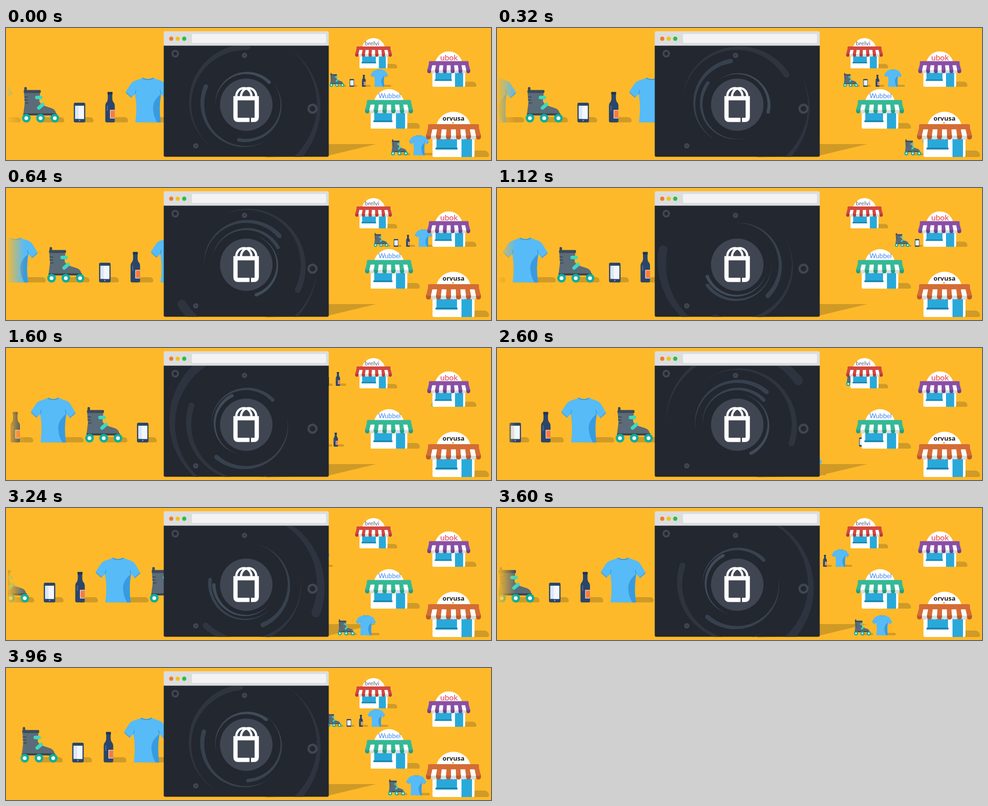
Recreate the animation shown at these times as an HTML page with a canvas. Size 970x265 px, loop 4000 ms.

```html
<!DOCTYPE html>
<html lang="en">
<head>
<meta charset="utf-8">
<title>Products travelling to shops</title>
<style>
  html, body { margin: 0; width: 100%; height: 100%; overflow: hidden; background: #fdb92a; }
  canvas { display: block; }
</style>
</head>
<body>
<canvas id="stage" width="970" height="265"></canvas>
<script>
const ctx = document.getElementById('stage').getContext('2d');
const LOOP = 4000, GROUND = '#fdb92a', SHADOW = '#d09a27', RAD = Math.PI / 180;

const fill = (color, path) => { ctx.fillStyle = color; ctx.fill(new Path2D(path)); };
const rect = (color, x, y, w, h, r = 0) => {
  ctx.fillStyle = color;
  ctx.beginPath();
  ctx.roundRect(x, y, w, h, r);
  ctx.fill();
};
const disc = (color, x, y, r) => {
  ctx.fillStyle = color;
  ctx.beginPath();
  ctx.arc(x, y, r, 0, 7);
  ctx.fill();
};
const ring = (color, x, y, r, width) => {
  ctx.strokeStyle = color;
  ctx.lineWidth = width;
  ctx.beginPath();
  ctx.arc(x, y, r, 0, 7);
  ctx.stroke();
};
const line = (color, width, path) => {
  ctx.strokeStyle = color;
  ctx.lineWidth = width;
  ctx.stroke(new Path2D(path));
};
const at = (x, y, scale, draw) => {
  ctx.save();
  ctx.translate(x, y);
  ctx.scale(scale, scale);
  draw();
  ctx.restore();
};
const clipped = (x, w, draw) => {
  ctx.save();
  ctx.beginPath();
  ctx.rect(x, 0, w, 265);
  ctx.clip();
  draw();
  ctx.restore();
};
const floorShadow = end => rect(SHADOW, 0, -10.5, end, 10.5, [0, 9, 5, 0]);

// Products stand on y = 0, centred on x = 0.
function skate() {
  floorShadow(48);
  rect('#3b4a59', -32, -71, 5, 12, 2);
  fill('#5b6b78', 'M-33-64H0L-2-43Q0-36 9-33L24-28Q31-25 32-16H-34L-31-40Z');
  rect('#3b4a59', -33, -65, 34, 6, 2);
  line('#3b4a59', 2, 'M-32-51h7M-32-45h7M-31-39h7');
  rect('#37434f', -34, -18, 67, 4, 1);
  line('#37434f', 4, 'M-28-10L-22-15M0-10V-15M29-10L22-15');
  ctx.lineCap = 'round';
  line('#3fd9bd', 7, 'M-7-50H1M-3-29L5-36');
  ctx.lineCap = 'butt';
  for (const x of [-28, 0.5, 29]) {
    disc('#0fae9c', x, -8.5, 8.7);
    disc('#fff', x, -8.5, 3.8);
  }
}
function phone() {
  floorShadow(28);
  rect('#2c4568', -11.5, -39.5, 23, 39.5, 3);
  rect('#dce8f8', -9, -33.5, 18, 26.5, 0.5);
  fill('#f3f7fd', 'M-2-33.5H9V-7H-2Z');
  disc('#8fa3bd', 0, -3.6, 1.3);
}
function bottle() {
  floorShadow(36);
  fill('#2c4568', 'M-4.500-61H4.500V-47Q4.500-43 8-39Q9.500-37 9.500-33V-3Q9.500 0 6.500 0H-6.500Q-9.500 0-9.500-3V-33Q-9.500-37-8-39Q-4.500-43-4.500-47Z');
  rect('#203453', -5, -61, 10, 5, 1);
  rect('#48638a', -6.500, -34, 2.500, 11, 1);
  rect('#fff', 0, -25, 9.5, 17);
  rect('#f57b45', 1, -24, 8.5, 15);
}
function shirt() {
  floorShadow(61);
  fill('#56bbf7', 'M-11-89Q0-85 11-89L25-84Q32-82 36-74L45-59L33-49L26-57Q21-28 25.500 0H-25.500Q-21-28-26-57L-33-50L-45-61L-36-75Q-32-82-25-84Z');
  fill('#389be0', 'M26-57Q9-44 10-27Q11-12 18 0H25.500Q21-28 26-57Z');
  line('#389be0', 2, 'M-11-89Q0-83 11-89');
  line('#389be0', 1.5, 'M-44-60L-33-50M44-59L33-49M-26-57L-24-65M26-57L24-65');
}

const belt = [[skate, 68.5], [phone, 147], [bottle, 208], [shirt, 284]];

// Each lane: lead position x at time `when`, then speed and acceleration per ms.
const lanes = [
  { y: 76, scale: 0.45, end: 735, when: 2040, x: 693, speed: 0.11, accel: -2e-5,
    items: [[skate, -33.5], [phone, 0], [bottle, 23]] },
  { y: 118, scale: 0.39, end: 885, when: 0, x: 746.5, speed: 0.145, accel: -1.1e-5,
    items: [[skate, -85], [phone, -55], [bottle, -31], [shirt, 0]] },
  { y: 198, scale: 0.46, end: 766, when: 2040, x: 679, speed: 0.09, accel: 0,
    items: [[phone, 0], [bottle, 20]] },
  { y: 255.5, scale: 0.45, end: 895, when: 0, x: 826, speed: 0.14, accel: 0,
    items: [[skate, -39.5], [shirt, 0]] }
];

const stores = [
  { x: 735, y: 81, scale: 0.667, color: '#d44840', dark: '#b43a35',
    name: 'brelvi', ink: '#55607a', font: '12px Lato, sans-serif', tx: 732, ty: 35 },
  { x: 885.5, y: 118, scale: 0.78, color: '#894fa5', dark: '#70408a',
    name: 'ubok', ink: '#e2383f', font: '16px Lato, sans-serif', tx: 886, ty: 65 },
  { x: 766, y: 202, scale: 0.87, color: '#36b896', dark: '#279d80',
    name: 'Wubbel', ink: '#4285f4', font: '13px Lato, sans-serif', tx: 767, ty: 141 },
  { x: 895, y: 259, scale: 1, color: '#d46c36', dark: '#b9592d',
    name: 'orvusa', ink: '#27221f', font: 'bold 13px "Open Sans", sans-serif', tx: 895, ty: 186, dot: [894, 190.5, 1.8] }
];

function store(s) {
  at(s.x, s.y, s.scale, () => {
    rect(SHADOW, 38, -13, 33, 13, [0, 12, 5, 0]);
    disc('#fff', 0, -56, 35);
    rect('#fff', -42, -46, 84, 46, [0, 0, 3, 3]);
    rect('#e4e6e8', -42, -40, 84, 5);
    rect('#29a9d9', -34, -36, 41, 18);
    rect('#1d86b4', -36, -19, 44, 4, 1);
    rect('#29a9d9', 16, -36, 21, 36);
    const stripes = 11, topWidth = 102 / stripes;
    for (let i = 0; i < stripes; i++) {
      const x = -55 + i * 10, top = -51 + i * topWidth;
      const even = i % 2 === 0;
      rect(even ? s.dark : '#d9dcdf', x, -45, 10, 10, [0, 0, 5, 5]);
      fill(even ? s.color : '#fff', `M${top}-58h${topWidth}L${x + 10}-43H${x}Z`);
    }
    rect(s.color, -51, -66, 102, 10.5, [3, 3, 0, 0]);
  });
  ctx.font = s.font;
  ctx.textAlign = 'center';
  ctx.fillStyle = s.ink;
  ctx.fillText(s.name, s.tx, s.ty);
  if (s.dot) disc('#f39a2b', ...s.dot);
}

// Inner radius, head width, head angle at the start, turns per loop, colour.
const swirls = [
  [142, 18, 90.4, 1, '#2e343f'],
  [109.5, 12, 271, 2, '#2e353f'],
  [83.5, 9, 204, 2, '#37414d'],
  [69, 7, 101, 4, '#394350'],
  [61, 6.5, -44, 2, '#414b58']
];

function swirl(inner, width, start, turns, color, phase) {
  const head = (start + 360 * turns * phase) * RAD, length = 142 * RAD, steps = 48;
  const mid = inner + width / 2;
  ctx.fillStyle = color;
  ctx.beginPath();
  ctx.arc(0, 0, inner, head - length, head);
  for (let i = 0; i <= steps; i++) {
    const r = inner + width * (1 - i / steps), a = head - length * i / steps;
    ctx.lineTo(r * Math.cos(a), r * Math.sin(a));
  }
  ctx.fill();
  disc(color, mid * Math.cos(head), mid * Math.sin(head), width / 2);
}

function bag() {
  line('#fff', 4.5, 'M460.500 138C460.500 115 491 115 491 138M470 138C470 115 500.500 115 500.500 138');
  line('#fff', 8.5, 'M490 184.500H496Q501.500 184.500 501.500 179V141H459V179Q459 184.500 464.500 184.500H487');
}

function browser(phase) {
  ctx.save();
  ctx.beginPath();
  ctx.roundRect(315.5, 6.5, 330, 252, 3);
  ctx.clip();
  rect('#222730', 315, 35, 331, 224);
  ctx.save();
  ctx.beginPath();
  ctx.rect(315, 35.5, 331, 224);
  ctx.clip();
  at(480, 153.5, 1, () => swirls.forEach(s => swirl(...s, phase)));
  ctx.restore();
  ring('#414652', 338.5, 51.5, 5.7, 4);
  ring('#414652', 613, 162, 8, 4.5);
  for (const [x, y] of [[477, 55], [379.5, 236.5]]) {
    disc('#414652', x, y, 5.3);
    disc('#333843', x, y, 2);
  }
  disc('#404552', 480.5, 154, 52.5);
  bag();
  rect('#dcddde', 315, 6, 331, 29.5);
  rect('#f3f3f4', 372, 12, 268, 18, 2);
  disc('#f47b20', 330.5, 21.5, 4.2);
  disc('#efc31c', 343.5, 21.5, 4.2);
  disc('#2fbb3c', 356.5, 21.5, 4.2);
  ctx.restore();
}

function drawLane(lane, time) {
  const d = (time - lane.when + 1500 + LOOP) % LOOP - 1500;
  const lead = lane.x + lane.speed * d + lane.accel * d * d;
  clipped(500, lane.end - 500, () => {
    for (const [item, offset] of lane.items) at(lead + offset, lane.y, lane.scale, item);
  });
}

function drawBelt(phase) {
  clipped(4.5, 320, () => {
    for (const wrap of [-316, 0])
      for (const [item, x] of belt) at(x + wrap + 316 * phase, 189.5, 1, item);
    const fade = ctx.createLinearGradient(0, 0, 37, 0);
    fade.addColorStop(0, GROUND);
    fade.addColorStop(1, 'rgba(253,185,42,0)');
    rect(fade, 0, 36, 42, 224);
  });
}

function frame() {
  const time = performance.now() % LOOP, phase = time / LOOP;
  rect(GROUND, 0, 0, 970, 265);
  fill(SHADOW, 'M520 233H741L645 256L520 260Z');
  lanes.forEach(lane => drawLane(lane, time));
  stores.forEach(store);
  drawBelt(phase);
  browser(phase);
  requestAnimationFrame(frame);
}
frame();
</script>
</body>
</html>
```
